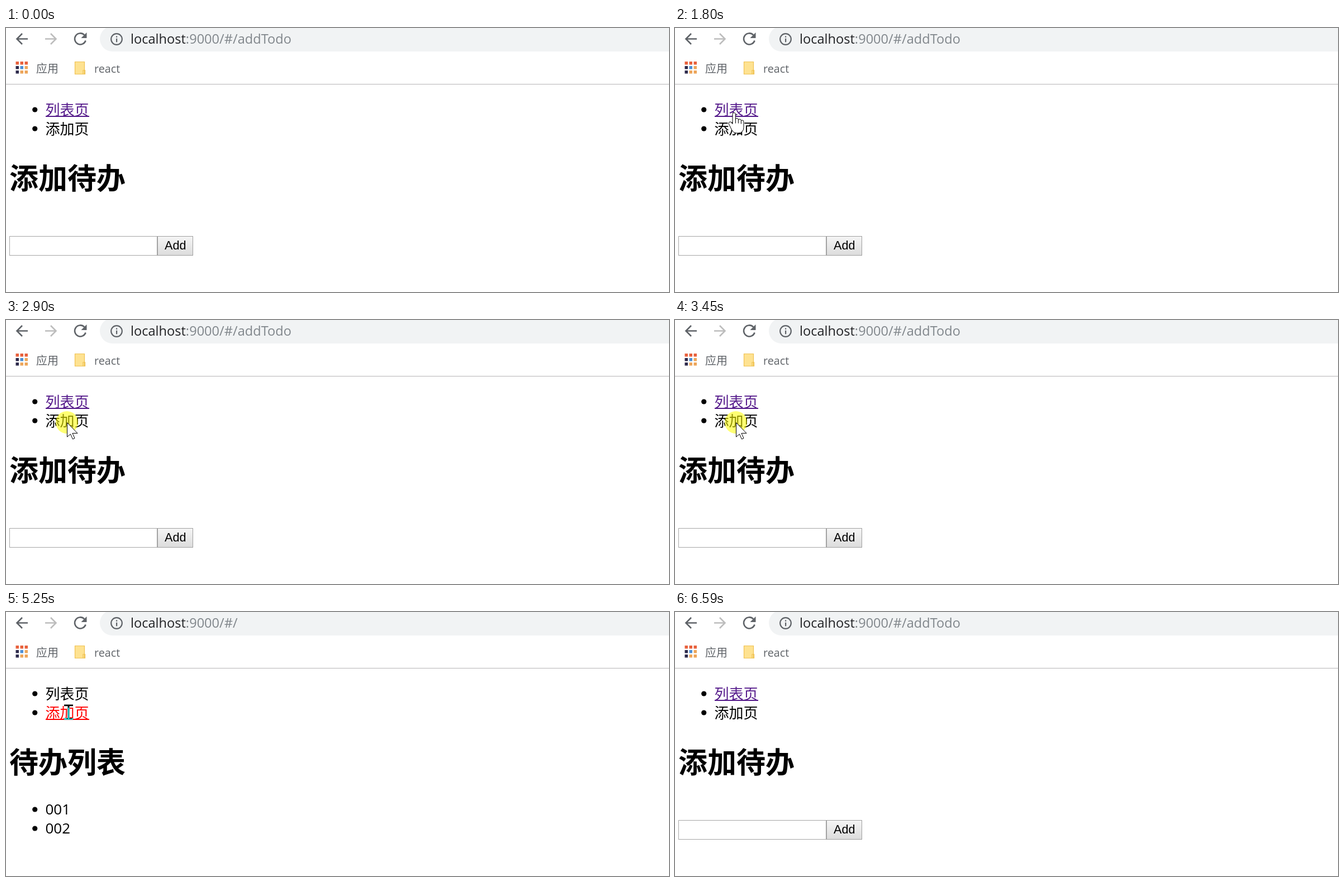
These frames come from a looping animation (1187 px wide and 472 px high, 7.22 s). An HTML page:

```html
<!DOCTYPE html>
<html lang="zh-CN">
<head>
<meta charset="utf-8">
<title>Todo router demo</title>
<style>
  html, body { margin: 0; width: 100%; height: 100%; overflow: hidden; background: #fff; }
  svg { display: block; width: 1187px; height: 472px; isolation: isolate; }
  text { font-family: "Noto Sans CJK SC", "Noto Sans CJK", sans-serif; font-size: 26px; white-space: pre; }
  .latin { font-family: "Open Sans", "Noto Sans", sans-serif; }
  .icon { fill: none; stroke: #5f6368; stroke-width: 2.6; }
  .title { font-size: 52px; font-weight: bold; }
  .shape { fill: #fff; stroke: #000; stroke-linejoin: round; }
  #beam { mix-blend-mode: difference; }
</style>
</head>
<body>
<svg viewBox="0 0 1187 472">
  <defs>
    <linearGradient id="face" x2="0" y2="1">
      <stop stop-color="#f5f5f5"/><stop offset="1" stop-color="#dcdcdc"/>
    </linearGradient>
  </defs>
  <rect width="1187" height="472" fill="#fff"/>

  <!-- browser bar -->
  <rect x="168" y="-3" width="1100" height="45" rx="22.5" fill="#f1f3f4"/>
  <path class="icon" d="M39 19.5H20M29 10l-9.5 9.5 9.5 9.5"/>
  <path class="icon" style="stroke:#bdbdbd" d="M70 19.5h20M80 10l9.5 9.5-9.5 9.5"/>
  <path class="icon" d="M140.2 12.4A10 10 0 1 0 142.6 22.5"/>
  <path d="M144.5 8v10h-10z" fill="#5f6368"/>
  <circle class="icon" cx="198" cy="20" r="9.8" style="stroke-width:2.2"/>
  <path d="M197 14.5h2.2v2.2h-2.2zM197 18.7h2.2v6.5h-2.2z" fill="#5f6368"/>
  <text class="latin" x="223" y="28" style="font-size:23.6px" fill="#202124">localhost<tspan fill="#80868b">:9000/#/<tspan id="route"></tspan></tspan></text>
  <g id="apps"></g>
  <text x="54" y="80" style="font-size:20px" fill="#5f6368">应用</text>
  <path d="M123.5 60.500h17v22h-17zM138 82.500v-7h3.500v7z" fill="#fee291" stroke="#efc253" stroke-width="1.2"/>
  <text class="latin" x="158" y="80" style="font-size:19.8px" fill="#5f6368">react</text>
  <rect y="100" width="1187" height="1" fill="#b6b4b6"/>

  <!-- page -->
  <circle cx="51.7" cy="146" r="4.6"/>
  <circle cx="51.7" cy="180" r="4.6"/>
  <g class="link"><text x="70.5" y="156">列表页</text><rect x="71" y="157" width="78" height="2"/></g>
  <g class="link"><text x="70.5" y="190">添加页</text><rect x="71" y="191" width="78" height="2"/></g>
  <text id="title" class="title" x="6" y="288"></text>
  <g id="addPage">
    <rect x="6.5" y="372.5" width="264" height="34" fill="#fff" stroke="#a6a6a6"/>
    <rect x="271.5" y="372.5" width="63" height="34" fill="url(#face)" stroke="#a0a0a0"/>
    <text x="284" y="396" style="font:21.6px 'Liberation Sans',Arial,sans-serif">Add</text>
  </g>
  <g id="listPage">
    <circle cx="51.7" cy="353" r="4.6"/><text class="latin" x="70.5" y="362">001</text>
    <circle cx="51.7" cy="387" r="4.6"/><text class="latin" x="70.5" y="396">002</text>
  </g>

  <!-- pointer -->
  <circle id="ring" r="20" fill="#ff0" fill-opacity=".55"/>
  <path id="arrow" class="shape cursor" d="M.5 .5V26l6-5 4 9 3.500-1.600-4-8.900h9z"/>
  <g id="hand" class="shape cursor">
    <path d="M-3 20V2.500q0-2.500 2.700-2.500t2.700 2.500V12q0-2 2.500-2t2.500 2.500v1q0-2 2.500-2t2.500 2.500v1q0-1.500 2.300-1.500t2.300 2.500v10q0 10-10 10.500h-3q-5 0-8-5l-5-10q-2-3 0-4.500t3.500 0z"/>
    <path d="M2.400 11v8M7.400 13v6M12.400 15v5" fill="none"/>
  </g>
  <path id="beam" class="cursor" fill="#fff" d="M-8-13.500H8v2.700H1.500v21.600H8v2.700H-8v-2.700h6.500v-21.600H-8z"/>
</svg>
<script>
const LOOP = 7220, ENTER = 150, LEAVE = 6590;
const HOLD = 80, LOAD = 150, GLIDE = 240, REST = 180;
const byId = id => document.getElementById(id);
const show = (el, on) => { el.style.display = on ? "" : "none"; };
const links = [...document.querySelectorAll(".link")];
const cursors = [...document.querySelectorAll(".cursor")];

const [red, navy, orange, blue] = ["#e8613c", "#2e2b4d", "#eda55a", "#4d8fd6"];
byId("apps").innerHTML = [red, red, red, navy, blue, orange, navy, orange, orange].map((color, i) =>
  `<rect x="${17.5 + i % 3 * 8}" y="${60 + Math.floor(i / 3) * 8}" width="5.5" height="5.5" fill="${color}"/>`).join("");

// The pointer rests at each stop before the action: open a link, click plain text, or just pass
const stop = (at, action, x, y) => ({ at, action, x, y });
const stops = [
  stop(690, "open", 94, 149),
  stop(1510, "open", 106, 184),
  stop(2030, "open", 106, 145),
  stop(2540, "open", 108, 189),
  ...[2900, 3060, 3220, 3450].map(at => stop(at, "click", 109, 183)),
  stop(3950, "pass", 80, 171),
  stop(4330, "pass", 147, 176),
  stop(4540, "open", 112, 141),
  stop(5170, "open", 112, 179),
  stop(5550, "open", 112, 143),
  stop(5960, "open", 112, 180),
  stop(LEAVE + 100, "pass", 966, 455)
];
const opens = stops.filter(s => s.action === "open");
const presses = stops.filter(s => s.action !== "pass");

function pointerAt(t) {
  let x = 465, y = 270, free = ENTER;
  for (const next of stops) {
    const arrive = next.at - REST, start = Math.max(arrive - GLIDE, free);
    if (t >= start) {
      const p = t >= arrive ? 1 : (t - start) / (arrive - start);
      const eased = p * p * (3 - 2 * p);
      x += (next.x - x) * eased;
      y += (next.y - y) * eased;
    }
    free = next.action === "open" ? next.at + LOAD : next.at - REST;
  }
  return [x, y];
}

function draw(t) {
  const adding = opens.filter(s => t >= s.at + LOAD).length % 2 === 0;
  const active = opens.some(s => t >= s.at && t < s.at + LOAD);
  const pressed = presses.some(s => t >= s.at && t < s.at + HOLD);

  byId("route").textContent = adding ? "addTodo" : "";
  byId("title").textContent = adding ? "添加待办" : "待办列表";
  show(byId("addPage"), adding);
  show(byId("listPage"), !adding);
  links.forEach((link, i) => {
    const linked = adding === (i === 0);
    link.setAttribute("fill", !linked ? "#000" : active ? "#f00" : "#551a8b");
    show(link.lastElementChild, linked);
  });

  const [x, y] = pointerAt(t);
  const overLink = x < 149 && (adding ? y > 130 && y < 160 : y > 165 && y < 195);
  const idleShape = adding ? "arrow" : "beam";
  const shape = overLink && (adding || !active) ? "hand" : idleShape;
  const visible = t >= ENTER && t < LEAVE;
  for (const el of [byId("ring"), ...cursors]) el.setAttribute("transform", `translate(${x} ${y})`);
  cursors.forEach(el => show(el, visible && el.id === shape));
  show(byId("ring"), pressed);
}

const origin = performance.now();
function tick() {
  draw((performance.now() - origin) % LOOP);
  requestAnimationFrame(tick);
}
tick();
</script>
</body>
</html>
```
